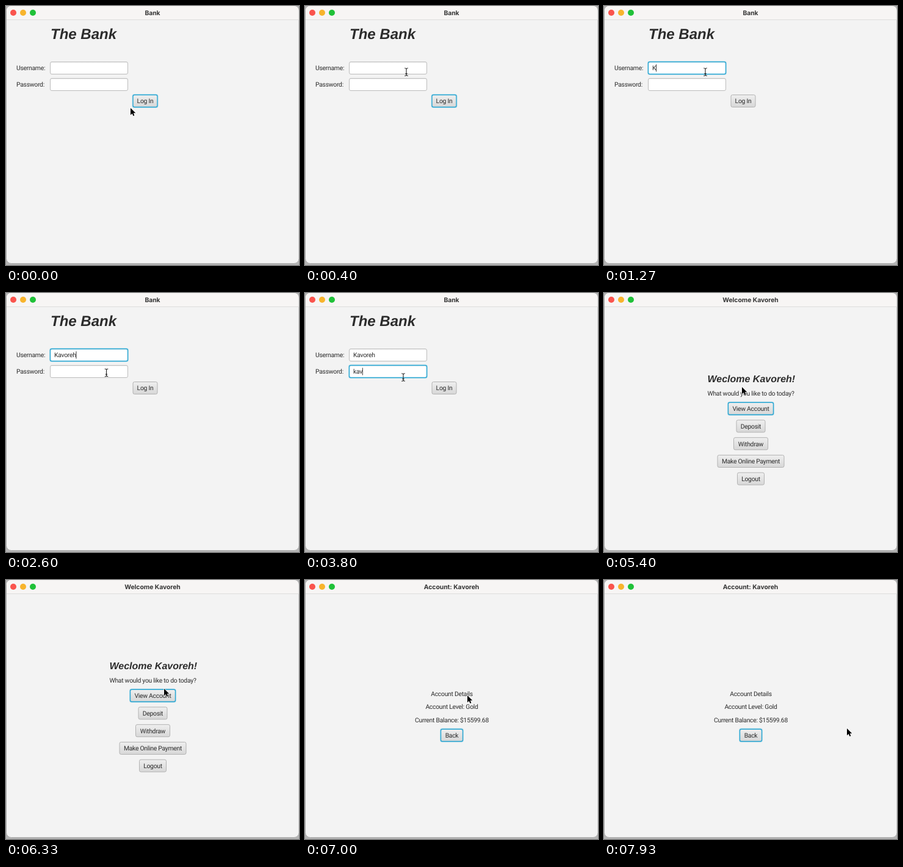
An HTML page that plays this animation: 480x424 px, repeating every 8 s.

```html
<!DOCTYPE html>
<html lang="en">
<head>
<meta charset="utf-8">
<title>Bank</title>
<style>
  html, body { margin: 0; width: 100%; height: 100%; overflow: hidden; background: #b4b4b4; }
  svg { display: block; width: 480px; height: 424px; }
  text { font: 10.4px Roboto, sans-serif; letter-spacing: -.28px; fill: #2c2c2c; text-rendering: geometricPrecision; }
  .mid { text-anchor: middle; }
  #title { font: 700 10.4px Inter, sans-serif; letter-spacing: -.05px; fill: #353535; }
  .head { font: italic 700 24px "Liberation Sans", Arial, sans-serif; letter-spacing: 0; }
  .small { font-size: 16px; }
  .box { fill: url(#face); stroke: #b2b2b2; }
  .hover .box { fill: url(#light); }
  .press .box { fill: url(#dark); }
  .field .box { fill: url(#paper); stroke: #bcbcbc; }
  .focus .box { stroke: #2ba6d2; stroke-width: 1.4; }
  .glow { fill: none; stroke: #039ed3; stroke-opacity: 0; stroke-width: 1.2; }
  .focus .glow { stroke-opacity: .22; }
</style>
</head>
<body>
<svg viewBox="0 0 480 424">
  <defs>
    <linearGradient id="face" x2="0" y2="1"><stop stop-color="#efefef"/><stop offset="1" stop-color="#d7d7d7"/></linearGradient>
    <linearGradient id="light" x2="0" y2="1"><stop stop-color="#f8f8f8"/><stop offset="1" stop-color="#e2e2e2"/></linearGradient>
    <linearGradient id="dark" x2="0" y2="1"><stop stop-color="#d8d8d8"/><stop offset="1" stop-color="#c6c6c6"/></linearGradient>
    <linearGradient id="paper" x2="0" y2="1"><stop stop-color="#eeeeee"/><stop offset=".13" stop-color="#fff"/></linearGradient>
  </defs>
  <rect width="480" height="424" fill="#b4b4b4"/>
  <rect x=".5" y="-.5" width="479.5" height="422" rx="8" fill="#f3f3f3" stroke="#a9a9a9"/>
  <path d="M1 22V8Q1 0 9 0H471Q479.5 0 479.5 8V22Z" fill="#f7f5f4"/>
  <path d="M1 22.5H480" stroke="#dedddc"/>
  <circle cx="12" cy="11" r="5" fill="#fa544d"/>
  <circle cx="28" cy="11" r="5" fill="#f8b42c"/>
  <circle cx="44" cy="11" r="5" fill="#20c138"/>
  <text id="title" class="mid" x="240" y="14.5"></text>
  <g id="scenes"></g>
  <path id="caret" d="M0 0V12" stroke="#222" stroke-width=".9"/>
  <path id="arrow" d="M0 0V11.5L2.7 9.1 4.5 13 6.4 12.2 4.7 8.3H8.3Z" stroke="#fff" stroke-width="1.2" paint-order="stroke"/>
  <path id="beam" d="M-2.8 -6.3Q0 -6.3 0 -4.6Q0 -6.3 2.8 -6.3M0 -4.8V4.8M-2.8 6.3Q0 6.3 0 4.6Q0 6.3 2.8 6.3M-1.6 2.6H1.6" fill="none" stroke="#222" stroke-width="1.1"/>
</svg>
<script>
const LOOP = 8000, TICK_RATE = 0.015;
const NAME = 'Kavoreh';
const $ = id => document.getElementById(id);

const label = (x, y, str, cls = '') => `<text x="${x}" y="${y}" class="${cls}">${str}</text>`;
const frame = (x, y, w, h) =>
  `<rect class="glow" x="${x - 1}" y="${y - 1}" width="${w + 2}" height="${h + 2}" rx="3.5"/>` +
  `<rect class="box" x="${x}" y="${y}" width="${w}" height="${h}" rx="2.5"/>`;
const button = (id, cx, y, w, str, cls = '') =>
  `<g id="${id}" class="${cls}">${frame(cx - w / 2, y, w, 20)}${label(cx, y + 13.9, str, 'mid')}</g>`;
const field = (id, y) =>
  `<g id="${id}" class="field">${frame(72.5, y, 127, 20)}${label(79, y + 13.6, '')}</g>`;

const scenes = [
  ['Bank',
    label(73, 54, 'The Bank', 'head') +
    label(17, 105, 'Username:') + field('user', 91.5) +
    label(17, 132, 'Password:') + field('pass', 118.5) +
    button('login', 228, 145.5, 40, 'Log In')],
  ['Welcome ' + NAME,
    label(241.3, 145.5, `Weclome ${NAME}!`, 'head small mid') +
    label(240.5, 167.6, 'What would you like to do today?', 'mid') +
    button('view', 240.5, 179.3, 74, 'View Account', 'focus') +
    button('deposit', 240.5, 208, 47, 'Deposit') +
    button('withdraw', 240.5, 236.7, 56, 'Withdraw') +
    button('pay', 240.5, 265.4, 109, 'Make Online Payment') +
    button('logout', 240.5, 294.1, 44, 'Logout')],
  ['Account: ' + NAME,
    label(240.5, 189.6, 'Account Details', 'mid') +
    label(240.5, 211.4, 'Account Level: Gold', 'mid') +
    label(240.5, 233, 'Current Balance: $15599.68', 'mid') +
    button('back', 240.5, 244.2, 36, 'Back', 'focus')]
];
$('scenes').innerHTML = scenes.map(s => `<g>${s[1]}</g>`).join('');
const groups = [...$('scenes').children];

// Pointer path: tick, x, y
const path = [
  [0, 204, 167], [1, 206, 163], [2, 209, 154], [3, 208, 147], [4, 187, 128], [5, 172, 112], [6, 166, 108],
  [38, 166, 108], [39, 164.5, 130.5], [40, 163, 134], [42, 161, 138],
  [68, 161, 138], [70, 170, 139], [71, 185, 142], [73, 219, 149], [74, 223, 152], [76, 226, 154],
  [90, 226, 154], [93, 243, 166], [95, 259, 178], [98, 266, 189],
  [116, 266, 189], [117, 300, 203], [118, 365, 230], [119, 398, 243]
];
// Ticks at which each letter arrives
const userKeys = [19, 26, 27, 28, 29, 33, 34];
const passKeys = [53, 55, 57, 58, 60, 63, 64];

function pointer(k) {
  const i = path.findIndex(p => p[0] >= k);
  if (i < 1) return path[i < 0 ? path.length - 1 : 0].slice(1);
  const [a, ax, ay] = path[i - 1], [b, bx, by] = path[i];
  const f = (k - a) / (b - a);
  return [ax + (bx - ax) * f, ay + (by - ay) * f];
}

const between = (v, lo, hi) => v >= lo && v < hi;
const show = (el, on) => el.setAttribute('display', on ? 'inline' : 'none');
const move = (el, x, y) => el.setAttribute('transform', `translate(${x} ${y})`);

function type(id, str, keys, k) {
  const el = $(id).querySelector('text');
  const n = keys.filter(t => t <= k).length;
  el.textContent = str.slice(0, n);
  return n ? el.getComputedTextLength() : 0;
}

function draw(k) {
  const scene = k < 80 ? 0 : k < 105 ? 1 : 2;
  const [x, y] = pointer(k);
  $('title').textContent = scenes[scene][0];
  groups.forEach((g, i) => show(g, i === scene));

  const userFocus = between(k, 10, 44), passFocus = between(k, 44, 77);
  const overLogin = between(x, 207, 248) && between(y, 145, 166);
  const overView = between(x, 203, 278) && between(y, 179, 200);
  $('user').classList.toggle('focus', userFocus);
  $('pass').classList.toggle('focus', passFocus);
  $('login').classList.toggle('focus', !userFocus && !passFocus);
  $('login').classList.toggle('hover', overLogin);
  $('login').classList.toggle('press', between(k, 77, 80));
  $('view').classList.toggle('hover', overView);
  $('view').classList.toggle('press', k === 104);

  let caretX = 0;
  if (scene === 0) {
    const u = type('user', NAME, userKeys, k);
    const p = type('pass', NAME.toLowerCase(), passKeys, k);
    caretX = 79.3 + (userFocus ? u : p);
  }
  show($('caret'), between(k, 11, 72));
  move($('caret'), caretX, userFocus ? 95.5 : 122.5);

  const inField = scene === 0 && between(x, 72, 200) &&
    (between(y, 91, 113) || between(y, 118, 140));
  show($('beam'), inField);
  show($('arrow'), !inField);
  move($(inField ? 'beam' : 'arrow'), x, y);
}

const start = performance.now();
let last = -1;
function loop() {
  const t = (performance.now() - start) % LOOP;
  const k = Math.floor(t * TICK_RATE + 0.06) % 120;
  if (k !== last) draw(last = k);
  requestAnimationFrame(loop);
}
loop();
</script>
</body>
</html>
```
